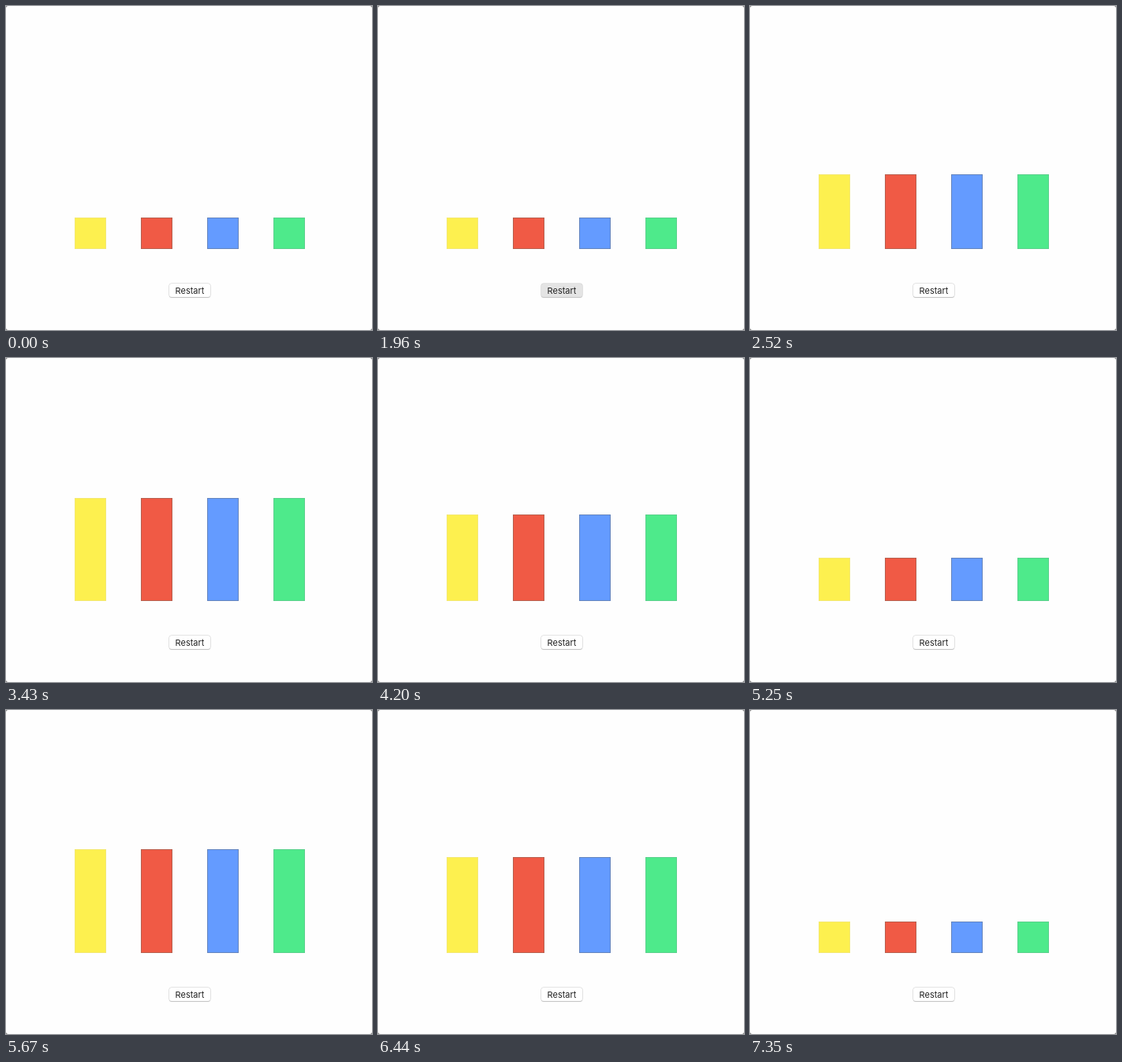
Animation of 464 by 412 pixels, one loop 7.84 s. Source, as an HTML page:

```html
<!DOCTYPE html>
<html lang="en">
<head>
<meta charset="utf-8">
<title>Growing bars</title>
<style>
  html, body { margin: 0; width: 100%; height: 100%; overflow: hidden; background: #777; }
  #stage { position: relative; width: 464px; height: 412px; background: #fefefe; border-radius: 3px; }
  .bar {
    position: absolute; bottom: 103px; width: 40px; height: 40px;
    background: var(--fill); box-shadow: inset 0 0 0 1px var(--edge);
  }
  #restart {
    position: absolute; left: 207px; top: 353px; width: 52px; height: 17px;
    border-radius: 3px; background: #fff;
    box-shadow: 0 0 0 .5px #ccc, 0 1px 1px #bbb;
    font: 11px/18px Inter, Roboto, sans-serif; color: #222; text-align: center;
  }
  #restart.down { background: #e4e4e4; }
</style>
</head>
<body>
<div id="stage">
  <div class="bar" style="left:87px; --fill:#fdf04f; --edge:#f3e872"></div>
  <div class="bar" style="left:171px; --fill:#f05a45; --edge:#b8604f"></div>
  <div class="bar" style="left:255px; --fill:#649bff; --edge:#6585bd"></div>
  <div class="bar" style="left:339px; --fill:#4eea8b; --edge:#5bd08c"></div>
  <div id="restart">Restart</div>
</div>
<script>
  const LOOP = 7840, STEP = 70;
  const REST = 40, GROWTH = 120;
  const RISE = 1000, PAUSE = 45, PRESS = 100;
  const clicks = [2044, 3651, 4414, 5004];

  const bars = document.querySelectorAll('.bar');
  const button = document.getElementById('restart');

  // cubic-bezier(.42, 0, .58, 1), solved by bisection
  function easeInOut(x) {
    if (x <= 0) return 0;
    if (x >= 1) return 1;
    let lo = 0, hi = 1, s = .5;
    for (let i = 0; i < 20; i++) {
      s = (lo + hi) / 2;
      const r = 1 - s;
      if (1.26 * s * r * r + 1.74 * s * s * r + s * s * s < x) lo = s;
      else hi = s;
    }
    return s * s * (3 - 2 * s);
  }

  // Each click restarts the rise and fall from the resting height
  function heightAt(t) {
    const start = clicks.filter(c => c <= t).pop();
    if (start === undefined) return REST;
    const age = t - start;
    const up = easeInOut(age / RISE);
    const down = easeInOut((age - RISE - PAUSE) / RISE);
    return REST + GROWTH * (up - down);
  }

  function draw(now) {
    const t = Math.floor(now % LOOP / STEP) * STEP;
    const height = Math.round(heightAt(t)) + 'px';
    bars.forEach(bar => { bar.style.height = height; });
    button.classList.toggle('down', clicks.some(c => t >= c - PRESS && t < c));
    requestAnimationFrame(draw);
  }
  requestAnimationFrame(draw);
</script>
</body>
</html>
```
